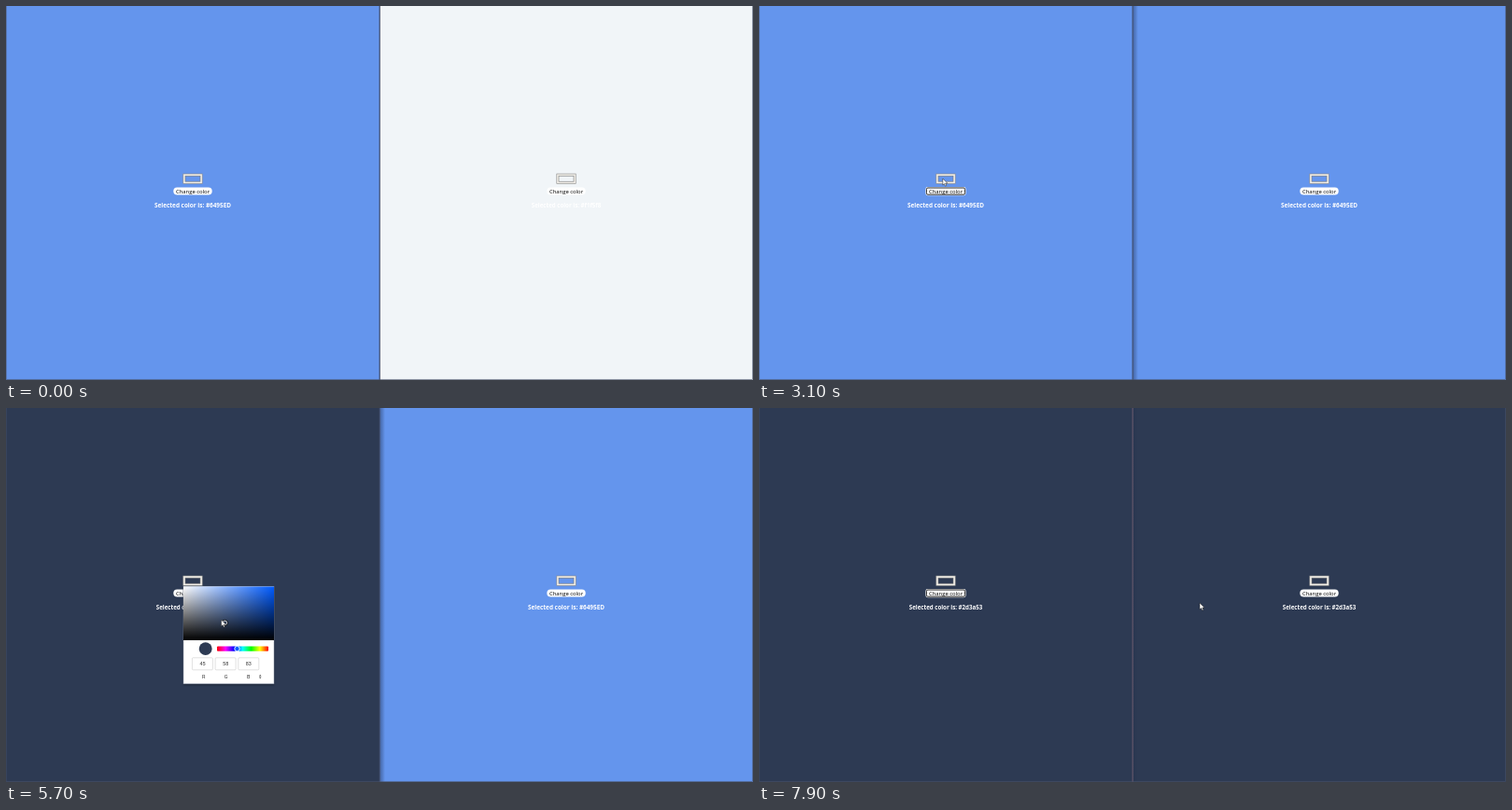
An HTML page for the animation above (8 s loop, 800x401 px).

```html
<!DOCTYPE html>
<html lang="en">
<head>
<meta charset="utf-8">
<title>Color sync between two windows</title>
<style>
  html, body { margin: 0; width: 100%; height: 100%; overflow: hidden; }
  svg { display: block; width: 800px; height: 401px; }
  text { font-family: "Open Sans", "Noto Sans", sans-serif; text-anchor: middle; }
  .label { font-weight: 700; fill: #fff; }
  .caption { font-size: 5.9px; font-weight: 500; fill: #000; }
  .picker text { font-family: Roboto, Arial, sans-serif; font-size: 5.5px; fill: #333; }
</style>
</head>
<body>
<svg viewBox="0 0 800 401" xmlns="http://www.w3.org/2000/svg">
  <defs>
    <linearGradient id="saturation">
      <stop stop-color="#fff"/><stop offset="1" stop-color="#005bff"/>
    </linearGradient>
    <linearGradient id="value" x2="0" y2="1">
      <stop stop-opacity="0"/><stop offset="1"/>
    </linearGradient>
    <linearGradient id="hue"></linearGradient>
    <linearGradient id="edge">
      <stop stop-color="#1c2a48" stop-opacity=".4"/><stop offset="1" stop-color="#1c2a48" stop-opacity="0"/>
    </linearGradient>
    <filter id="blur" x="-10%" y="-10%" width="120%" height="120%"><feGaussianBlur stdDeviation="1.2"/></filter>
  </defs>
  <g id="panes"></g>
  <rect id="shadow" x="401" width="5" height="401" fill="url(#edge)"/>
  <rect id="divider" x="399.6" width="1.2" height="401"/>
  <path d="M.25 0V400.5H799.5V0" fill="none" stroke="#49526a" stroke-opacity=".75" stroke-width=".8"/>
  <g id="picker" class="picker">
    <rect x="190" y="192" width="97" height="105" fill="#000" opacity=".35" filter="url(#blur)"/>
    <rect x="190" y="191.2" width="97" height="104.6" fill="#fff" stroke="#8b95a8" stroke-width=".5"/>
    <rect x="190" y="191.5" width="97" height="57.5" fill="url(#saturation)"/>
    <rect x="190" y="191.5" width="97" height="57.5" fill="url(#value)"/>
    <g id="marker" fill="none">
      <circle r="3" stroke="#111" stroke-width="1"/><circle r="2.2" stroke="#fff" stroke-width=".8"/>
    </g>
    <circle id="sample" cx="213.7" cy="258.2" r="6.9"/>
    <rect x="226" y="255.4" width="55" height="5.4" rx="1" fill="url(#hue)"/>
    <circle cx="247.5" cy="258.1" r="2.7" fill="#005bff" stroke="#fff" stroke-width=".9"/>
    <g id="fields"></g>
    <path d="M270.9 287.4l1.3-1.7 1.3 1.7zM270.9 288.6l1.3 1.7 1.3-1.7z" fill="#555"/>
  </g>
  <g id="cursor" fill="#fff" stroke="#222" stroke-width=".5" stroke-linejoin="round">
    <path id="arrow" d="M0 0V7L1.6 5.6 2.7 8.1 3.9 7.6 2.8 5.1H5Z"/>
    <path id="hand" d="M-.7 .6Q0-.4.7 .6V3.3Q1.5 2.8 1.9 3.6 2.7 3.1 3 4 4 3.6 4 4.8V6.5L3.1 9H-1L-3 5.6Q-2.9 4.5-1.9 5.1L-.7 6Z"/>
  </g>
</svg>
<script>
const DURATION = 8000, STEP = 100;
const PALE = '#f1f5f8', BLUE = '#6495ED', NAVY = '#2d3a53';
const FOCUS = 2200, SYNC = 2300, OPEN = 3300, PICK = 5200, CLOSE = 6300, REFOCUS = 7200, RESYNC = 7400;

// time, x, y of the pointer tip
const PATH = [
  [100, 400, 42], [400, 300, 235], [900, 205, 206], [1300, 192, 192], [1700, 197.8, 200],
  [2300, 197.8, 200], [3000, 196.8, 185], [3900, 196.8, 185], [4500, 226, 216],
  [5000, 235, 230], [5200, 234.4, 230], [5600, 230.5, 227], [5800, 230.5, 227],
  [6200, 172, 228], [6400, 172, 228], [7100, 205.5, 199.3], [7400, 205.5, 199.3], [7900, 472, 209]
];

const byId = id => document.getElementById(id);
const show = (node, visible) => node.setAttribute('visibility', visible ? 'inherit' : 'hidden');
const rgb = hex => [1, 3, 5].map(i => parseInt(hex.slice(i, i + 2), 16));

function makePane(x) {
  const pane = document.createElementNS('http://www.w3.org/2000/svg', 'g');
  pane.setAttribute('transform', `translate(${x})`);
  pane.innerHTML = `
    <rect class="back" width="400" height="401"/>
    <rect x="189.8" y="180" width="20.4" height="10.4" fill="#f2efe9" stroke="#858585" stroke-width=".6"/>
    <rect class="swatch" x="192" y="182.2" width="16" height="6" stroke="#777" stroke-width=".6"/>
    <rect class="button" x="179.3" y="194.6" width="41.4" height="8" rx="4"/>
    <g class="ring" fill="none">
      <rect x="179" y="194.6" width="42" height="8" rx="1.8" stroke="#fff" stroke-width="1.3"/>
      <rect x="179.4" y="195" width="41.2" height="7.2" rx="1.5" stroke="#111" stroke-width=".9"/>
    </g>
    <text class="caption" x="200" y="200.5">Change color</text>
    <text class="label" x="200" y="215.8"></text>`;
  byId('panes').append(pane);
  const find = name => pane.querySelector('.' + name);
  return (color, focused, hovered) => {
    find('back').setAttribute('fill', color);
    find('swatch').setAttribute('fill', color);
    find('button').setAttribute('fill', hovered ? '#e6e6e6' : '#fff');
    find('button').setAttribute('rx', focused ? 1.8 : 4);
    show(find('ring'), focused);
    find('label').textContent = 'Selected color is: ' + color;
    find('label').setAttribute('font-size', color === BLUE ? 6.4 : 6.15);
  };
}

const drawLeft = makePane(0), drawRight = makePane(400);

byId('hue').innerHTML = ['#f00', '#f0f', '#00f', '#0ff', '#0f0', '#ff0', '#f00']
  .map((color, i) => `<stop offset="${i / 6}" stop-color="${color}"/>`).join('');

byId('fields').innerHTML = [...'RGB'].map((name, i) => `
  <rect x="${199.4 + 24.7 * i}" y="267.8" width="22" height="13" rx="1" fill="#fff" stroke="#ccc" stroke-width=".6"/>
  <text class="channel" x="${210.6 + 24.6 * i}" y="276.3"></text>
  <text x="${211.6 + 24 * i}" y="290">${name}</text>`).join('');
const channels = document.querySelectorAll('.channel');

function drawPicker(color) {
  const parts = rgb(color), max = Math.max(...parts), min = Math.min(...parts);
  const x = 190 + 97 * (1 - min / max), y = 191.5 + 57.5 * (1 - max / 255);
  byId('marker').setAttribute('transform', `translate(${x} ${y})`);
  byId('sample').setAttribute('fill', color);
  channels.forEach((node, i) => node.textContent = parts[i]);
}

function pointerAt(t) {
  const next = PATH.findIndex(point => point[0] > t);
  if (next < 0) return PATH[PATH.length - 1].slice(1);
  const [t0, x0, y0] = PATH[Math.max(0, next - 1)], [t1, x1, y1] = PATH[next];
  const u = t1 > t0 ? (t - t0) / (t1 - t0) : 0, k = u * u * (3 - 2 * u);
  return [x0 + (x1 - x0) * k, y0 + (y1 - y0) * k];
}

function draw(t) {
  const [x, y] = pointerAt(t);
  const opened = t >= OPEN && t < CLOSE;
  const focused = t >= FOCUS && t < OPEN || t >= REFOCUS;
  const hovered = !opened && x > 179 && x < 221 && y > 194.5 && y < 203;
  const leftColor = t < PICK ? BLUE : NAVY;
  const rightColor = t < SYNC ? PALE : t < RESYNC ? BLUE : NAVY;

  drawLeft(leftColor, focused, hovered && t >= 100);
  drawRight(rightColor, false, false);
  drawPicker(leftColor);
  show(byId('picker'), opened);

  show(byId('shadow'), t >= FOCUS);
  byId('shadow').setAttribute('opacity', rightColor === BLUE ? 1 : .45);
  byId('divider').setAttribute('fill', t >= RESYNC ? '#62566a' : t >= FOCUS && t < SYNC ? '#84797f' : '#3e4a66');

  byId('cursor').setAttribute('transform', `translate(${x} ${y})`);
  show(byId('cursor'), t >= 100);
  show(byId('arrow'), !hovered);
  show(byId('hand'), hovered);
}

const start = performance.now();
function tick() {
  const t = (performance.now() - start) % DURATION;
  draw(Math.floor(t / STEP) * STEP);
  requestAnimationFrame(tick);
}
tick();
</script>
</body>
</html>
```
